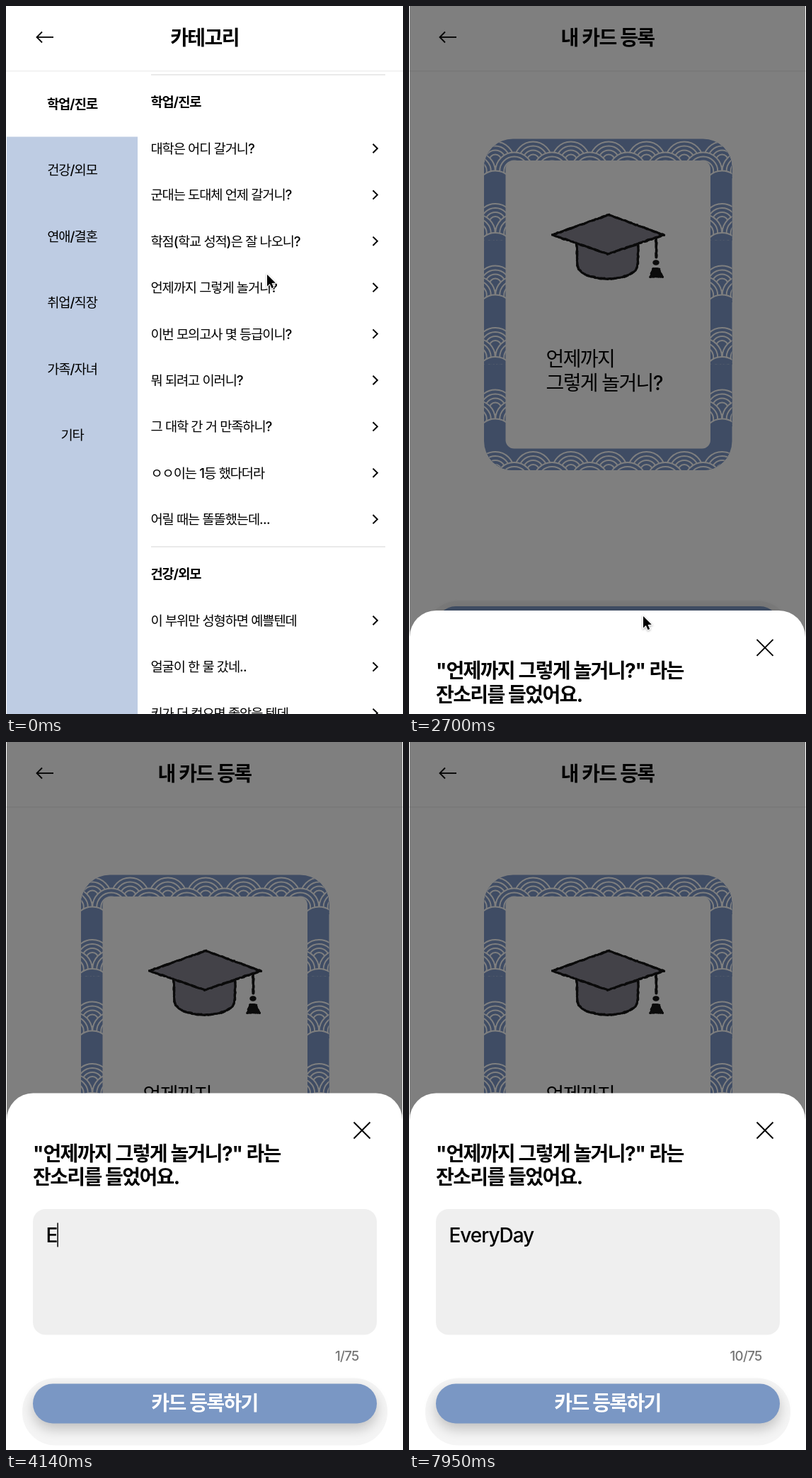
An HTML page with a canvas that plays this animation: 561x999 px, repeating every 8000 ms.

```html
<!DOCTYPE html>
<html lang="ko">
<head>
<meta charset="utf-8">
<title>카드 등록</title>
<style>
html, body { margin: 0; width: 100%; height: 100%; overflow: hidden; background: #fff; }
canvas { display: block; width: 561px; height: 999px; }
</style>
</head>
<body>
<canvas id="stage" width="561" height="999"></canvas>
<script>
const ctx = document.getElementById('stage').getContext('2d');
const W = 561, H = 999, LOOP = 8000;
const FONT = 'Inter, "Noto Sans CJK KR", "Noto Sans CJK", sans-serif';
const BIG = 28, SMALL = 18.7;
const BLUE = '#7a97c4', CARD = '#7e99c9';
const QUOTE = '언제까지 그렇게 놀거니?';

const TABS = ['학업/진로', '건강/외모', '연애/결혼', '취업/직장', '가족/자녀', '기타'];
const STUDY = ['대학은 어디 갈거니?', '군대는 도대체 언제 갈거니?', '학점(학교 성적)은 잘 나오니?',
  QUOTE, '이번 모의고사 몇 등급이니?', '뭐 되려고 이러니?', '그 대학 간 거 만족하니?',
  'ㅇㅇ이는 1등 했다더라', '어릴 때는 똘똘했는데...'];
const LOOKS = ['이 부위만 성형하면 예쁠텐데', '얼굴이 한 물 갔네..', '키가 더 컸으면 좋았을 텐데'];

const TYPED = 'EveryDay  ';
const KEYS = [4110, 4290, 4440, 4680, 4830, 5040, 5190, 5280, 5520, 6420];
const OPEN_PAGE = 1020, DIM = 2520, SHEET = 2670, FOCUS = 3450;

// time, x, y of the pointer
const POINTER = [[0, 369, 379], [30, 369, 379], [450, 342, 390], [690, 340, 393], [1350, 340, 393],
  [1770, 335, 861], [2310, 336, 861], [2520, 336, 861], [2670, 331, 861], [2730, 331, 861],
  [2880, 300, 851], [3240, 290, 775]];

const clamp = v => Math.max(0, Math.min(1, v));
const mix = (a, b, p) => a + (b - a) * p;

// CSS "ease": cubic-bezier(.25, .1, .25, 1)
function ease(x) {
  let lo = 0, hi = 1, s = 0;
  for (let i = 0; i < 20; i++) {
    s = (lo + hi) / 2;
    const bx = .75 * s * (1 - s) * (1 - s) + .75 * s * s * (1 - s) + s * s * s;
    if (bx < x) lo = s; else hi = s;
  }
  return .3 * s * (1 - s) * (1 - s) + 3 * s * s * (1 - s) + s * s * s;
}

// Hangul is tracked tighter than Latin, so text is laid out in runs
function layout(str, size, weight) {
  ctx.font = `${weight} ${size}px ${FONT}`;
  let width = 0;
  const runs = (str.match(/[가-힣ㅇ]+|[^가-힣ㅇ]+/g) || []).map(s => {
    const spacing = `${(/[가-힣ㅇ]/.test(s) ? -.058 : -.038) * size}px`;
    ctx.letterSpacing = spacing;
    const run = { s, spacing, x: width };
    width += ctx.measureText(s).width;
    return run;
  });
  return { runs, width };
}

// y is the middle of the glyphs
function text(str, x, y, size, weight = 500, color = '#000', align = 0) {
  const { runs, width } = layout(str, size, weight);
  ctx.fillStyle = color;
  for (const run of runs) {
    ctx.letterSpacing = run.spacing;
    ctx.fillText(run.s, x - width * align + run.x, y + .37 * size);
  }
}

function box(x, y, w, h, r, color) {
  ctx.fillStyle = color;
  ctx.beginPath();
  ctx.roundRect(x, y, w, h, r);
  ctx.fill();
}

function line(points, width, color = '#000') {
  ctx.strokeStyle = color;
  ctx.lineWidth = width;
  ctx.beginPath();
  points.forEach(([x, y]) => ctx.lineTo(x, y));
  ctx.stroke();
}

function header(title) {
  ctx.fillStyle = '#efefef';
  ctx.fillRect(0, 91, W, 1.5);
  line([[67, 44], [43.5, 44]], 1.8);
  line([[51, 36.5], [43.5, 44], [51, 51.5]], 1.8);
  text(title, 280.5, 44.5, BIG, 700, '#000', .5);
}

function section(title, rows, top) {
  ctx.fillStyle = '#e2e2e2';
  ctx.fillRect(205, top - .7, 331, 1.4);
  text(title, 204.5, top + 38.5, SMALL, 700);
  rows.forEach((row, i) => {
    const y = top + 104 + i * 65.4;
    text(row, 204.5, y, SMALL);
    line([[518.5, y - 6.2], [524.8, y], [518.5, y + 6.2]], 2);
  });
}

function categoryPage() {
  header('카테고리');
  ctx.fillStyle = '#becce3';
  ctx.fillRect(1, 184.5, 185, H);
  TABS.forEach((tab, i) => text(tab, 93.5, 137.8 + i * 93.45, SMALL, i ? 500 : 700, '#000', .5));
  section('학업/진로', STUDY, 97);
  section('건강/외모', LOOKS, 763);
}

function fan(x, y, radii) {
  ctx.fillStyle = CARD;
  ctx.strokeStyle = '#fff';
  ctx.lineWidth = 1.9;
  radii.forEach(r => {
    ctx.beginPath();
    ctx.arc(x, y, r, 0, Math.PI * 2);
    ctx.fill();
    ctx.stroke();
  });
}

function waveBand(top) {
  const radii = [26.5, 20.5, 14.5, 8.5], step = 53.4;
  ctx.save();
  ctx.beginPath();
  ctx.rect(100, top - 2, 362, 54);
  ctx.clip();
  for (let i = -1; i < 8; i++) fan(122 + i * step, top + 27, radii);
  for (let i = -1; i < 8; i++) fan(95.3 + i * step, top + 42, radii);
  for (let i = -1; i < 8; i++) fan(122 + i * step, top + 68, [26.5]);
  ctx.restore();
}

// hand-drawn outline made of short wobbly strokes
function sketch(path, fill, width, rnd) {
  if (fill) {
    ctx.fillStyle = fill;
    ctx.beginPath();
    path.forEach(([x, y]) => ctx.lineTo(x, y));
    ctx.fill();
  }
  for (let i = 1; i < path.length; i++) {
    const [ax, ay] = path[i - 1], [bx, by] = path[i];
    const n = Math.max(1, Math.round(Math.hypot(bx - ax, by - ay) / 2.5));
    for (let k = 0; k < n; k++) {
      const at = p => [mix(ax, bx, p) + rnd() - .5, mix(ay, by, p) + rnd() - .5];
      line([at(k / n), at((k + 1.3) / n)], width * (.8 + .4 * rnd()), '#161616');
    }
  }
}

function gradCap() {
  let seed = 7;
  const rnd = () => (seed = seed * 16807 % 2147483647) / 2147483647;
  const base = [[237, 336]];
  for (let a = 0; a <= 12; a++) {
    const q = Math.PI * a / 12;
    base.push([280.5 - 42.5 * Math.cos(q), 366 + 19 * Math.sin(q)]);
  }
  base.push([324, 337]);
  ctx.save();
  ctx.lineCap = 'round';
  sketch(base, '#878592', 3, rnd);
  sketch([[202.5, 323], [282, 294.5], [360, 323], [281, 350], [202.5, 323]], '#878592', 3, rnd);
  sketch([[349, 326], [349.5, 354]], null, 3.4, rnd);
  ctx.fillStyle = '#161616';
  ctx.beginPath();
  ctx.ellipse(349, 362, 4.7, 3.8, 0, 0, 7);
  ctx.fill();
  sketch([[345, 371], [353, 371], [358, 382], [341, 382], [345, 371]], '#161616', 2.6, rnd);
  ctx.restore();
}

function button(label, y) {
  box(23, y - 8, 516, 95, 47, '#f5f5f5');
  ctx.save();
  ctx.shadowColor = 'rgba(0,0,0,.22)';
  ctx.shadowBlur = 18;
  ctx.shadowOffsetY = 8;
  box(38, y, 486, 56, 28, BLUE);
  ctx.restore();
  text(label, 280.5, y + 27, BIG, 700, '#fff', .5);
}

function cardPage() {
  header('내 카드 등록');
  ctx.save();
  ctx.beginPath();
  ctx.roundRect(106, 187.5, 350.5, 467.5, 41);
  ctx.clip();
  ctx.fillStyle = CARD;
  ctx.fillRect(100, 180, 362, 480);
  for (let i = 0; i < 6; i++) waveBand(191 + i * 87.5);
  ctx.restore();
  box(136.5, 218, 289.5, 406.5, 12, '#fff');
  gradCap();
  text('언제까지', 193.5, 498, BIG);
  text('그렇게 놀거니?', 193.5, 531.6, BIG);
  button('잔소리 반응 등록하기', 847);
}

function caretAlpha(t, count) {
  if (t < FOCUS) return 0;
  const last = count ? KEYS[Math.min(count, 8) - 1] : 3570;
  const p = t - last - 240;
  if (p < 0) return 1;
  const c = p % 945;
  return c < 545 ? clamp(1 - c / 300) : clamp((c - 545) / 105);
}

function sheet(t) {
  const top = mix(999, 495.5, ease(clamp((t - 2612) / 450)));
  const count = KEYS.filter(k => t >= k).length;
  const typed = TYPED.slice(0, count);

  box(1, top, 559, H, [37.4, 37.4, 0, 0], '#fff');
  line([[491.5, top + 41], [514.5, top + 64]], 2);
  line([[514.5, top + 41], [491.5, top + 64]], 2);
  text(`"${QUOTE}" 라는`, 38, top + 85, BIG, 700);
  text('잔소리를 들었어요.', 38, top + 118.6, BIG, 700);

  box(38, top + 163.5, 486, 177.5, 18, '#efefef');
  if (count) text(typed, 56.5, top + 200, BIG);
  else text('어떻게 반응하셨나요? (선택 사항)', 56.5, top + 200, BIG, 500, '#757575');

  const x = 56.5 + layout(typed, BIG, 500).width;
  ctx.globalAlpha = caretAlpha(t, count);
  ctx.fillStyle = '#000';
  ctx.fillRect(x, top + 183, 1.5, 34);
  ctx.globalAlpha = 1;

  text(`${count}/75`, 498.5, top + 371, SMALL, 500, '#757575', 1);
  button('카드 등록하기', top + 410);
}

function pointerAt(t) {
  const i = POINTER.findIndex(p => p[0] > t);
  if (i < 0) return POINTER[POINTER.length - 1].slice(1);
  const a = POINTER[i - 1], b = POINTER[i];
  let p = (t - a[0]) / (b[0] - a[0]);
  p = p * p * (3 - 2 * p);
  return [mix(a[1], b[1], p), mix(a[2], b[2], p)];
}

function arrow() {
  ctx.beginPath();
  [[0, 0], [0, 16.5], [3.8, 13], [6.6, 19.2], [9.2, 18.1], [6.5, 12.1], [11.8, 11.8]]
    .forEach(([x, y]) => ctx.lineTo(x, y));
  ctx.closePath();
  ctx.save();
  ctx.shadowColor = 'rgba(0,0,0,.35)';
  ctx.shadowBlur = 3;
  ctx.shadowOffsetY = 1;
  ctx.strokeStyle = '#fff';
  ctx.lineWidth = 2;
  ctx.stroke();
  ctx.restore();
  ctx.fillStyle = '#000';
  ctx.fill();
}

function beam() {
  for (const [w, c] of [[3.2, '#fff'], [1.3, '#000']]) {
    line([[0, -7.5], [0, 7.5]], w, c);
    line([[-3.5, -9], [-1.5, -8.8], [0, -7.5], [1.5, -8.8], [3.5, -9]], w, c);
    line([[-3.5, 9], [-1.5, 8.8], [0, 7.5], [1.5, 8.8], [3.5, 9]], w, c);
    line([[-2.5, 2.5], [2.5, 2.5]], w, c);
  }
}

function pointer(t) {
  if (t >= KEYS[0]) return;
  ctx.save();
  ctx.translate(...pointerAt(t));
  if (t < 2820) arrow(); else beam();
  ctx.restore();
}

function draw(t) {
  ctx.fillStyle = '#fff';
  ctx.fillRect(0, 0, W, H);
  if (t < OPEN_PAGE) categoryPage(); else cardPage();
  if (t >= DIM) {
    ctx.fillStyle = 'rgba(0,0,0,.5)';
    ctx.fillRect(1, 0, 559, H);
  }
  if (t >= SHEET) sheet(t);
  pointer(t);
}

function tick() {
  draw(performance.now() % LOOP);
  requestAnimationFrame(tick);
}
tick();
</script>
</body>
</html>
```
